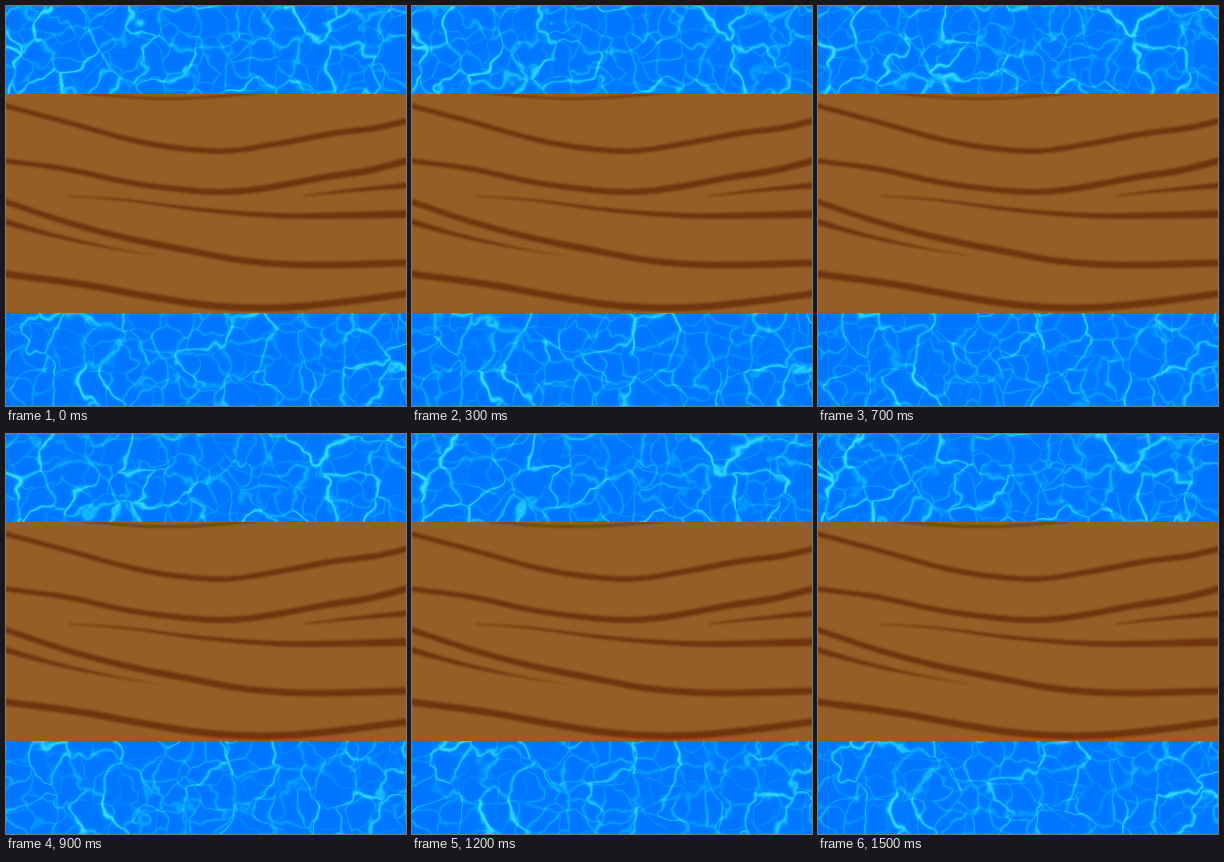
Write an HTML page with a canvas that moves like this. It is 400 px wide and 400 px high and loops after 1600 ms.

```html
<!DOCTYPE html>
<html lang="en">
<head>
<meta charset="utf-8">
<title>Plank over water</title>
<style>
  html, body { margin: 0; width: 100%; height: 100%; overflow: hidden; background: #007aff; }
  canvas, svg { position: absolute; left: 0; top: 0; width: 400px; height: 400px; display: block; }
</style>
</head>
<body>
<canvas id="water" width="400" height="400"></canvas>
<svg viewBox="0 0 400 400">
  <defs>
    <filter id="soft" x="-5%" y="-5%" width="110%" height="110%"><feGaussianBlur stdDeviation="0.8"/></filter>
    <clipPath id="board"><rect y="88" width="400" height="219"/></clipPath>
  </defs>
  <rect y="88" width="400" height="219" fill="#955e26"/>
  <g clip-path="url(#board)"><g id="grain" fill="#6f340d" filter="url(#soft)"></g></g>
</svg>
<script>
const SIZE = 400, LOOP = 1600, STEP = 100, STEPS = LOOP / STEP;
const TOP = 88, BOTTOM = 307;

// Wood grain: start width, end width, then x,y points along the line
const grain = [
  [2, 2, '76,87 135,92 190,92 252,87'],
  [5, 6, '-6,98 0,100 60,116 130,135 180,143 222,145 270,138 330,127 370,122 400,115 406,113'],
  [5, 7, '-6,154 0,155 60,163 120,176 180,184 220,186 260,182 320,171 360,165 400,155 406,153'],
  [1, 8, '63,190 120,194 180,202 230,207 290,210 406,208'],
  [1, 6, '297,190 340,185 406,179'],
  [6, 7, '-6,194 0,196 60,216 120,232 190,246 240,255 300,259 406,257'],
  [6, 0, '-6,214 0,216 50,230 100,241 159,251'],
  [7, 7, '-6,267 0,268 80,279 140,290 200,299 255,302 310,299 406,287']
];

// Smooth cubic segments through the points
function curve(pts) {
  let d = '';
  for (let i = 0; i < pts.length - 1; i++) {
    const a = pts[Math.max(i - 1, 0)], b = pts[i], c = pts[i + 1], e = pts[Math.min(i + 2, pts.length - 1)];
    const k = (c[0] - b[0]) / 3;
    const slope = (p, q) => (q[1] - p[1]) / (q[0] - p[0]);
    d += `C${b[0] + k},${b[1] + k * slope(a, c)} ${c[0] - k},${c[1] - k * slope(b, e)} ${c[0]},${c[1]}`;
  }
  return d;
}

for (const [w0, w1, text] of grain) {
  const pts = text.split(' ').map(p => p.split(',').map(Number));
  const x0 = pts[0][0], span = pts[pts.length - 1][0] - x0;
  const edge = side => pts.map(([x, y]) => [x, y + side * (w0 + (w1 - w0) * (x - x0) / span) / 2]);
  const upper = edge(-1), lower = edge(1).reverse();
  const path = document.createElementNS('http://www.w3.org/2000/svg', 'path');
  path.setAttribute('d', `M${upper[0]}${curve(upper)}L${lower[0]}${curve(lower)}Z`);
  document.getElementById('grain').append(path);
}

function hash(x, y, seed) {
  let h = Math.imul(x, 374761393) ^ Math.imul(y, 668265263) ^ Math.imul(seed, 1274126177);
  h = Math.imul(h ^ (h >>> 15), 2246822519);
  h = Math.imul(h ^ (h >>> 13), 3266489917);
  return ((h ^ (h >>> 16)) >>> 0) / 4294967296;
}

function noise(x, y, seed) {
  const i = Math.floor(x), j = Math.floor(y);
  let u = x - i, v = y - j;
  u *= u * (3 - 2 * u);
  v *= v * (3 - 2 * v);
  const a = hash(i, j, seed), b = hash(i + 1, j, seed);
  const c = hash(i, j + 1, seed), d = hash(i + 1, j + 1, seed);
  return a + (b - a) * u + (c - a + (a - b - c + d) * u) * v;
}

// A net of cells whose centres circle once per loop; returns line brightness at a point
function makeNet(cell, width, seed, angle) {
  const cols = Math.ceil(SIZE / cell) + 6, xs = [], ys = [];
  for (let n = 0; n < cols * cols; n++) {
    const i = n % cols, j = Math.floor(n / cols);
    const turn = angle + hash(i, j, seed + 2) * Math.PI * 2;
    xs[n] = (i - 3 + 0.1 + 0.8 * hash(i, j, seed) + 0.1 * Math.cos(turn)) * cell;
    ys[n] = (j - 3 + 0.1 + 0.8 * hash(i, j, seed + 1) + 0.1 * Math.sin(turn)) * cell;
  }
  return (x, y, gain) => {
    const ci = Math.floor(x / cell) + 3, cj = Math.floor(y / cell) + 3;
    let d1 = 1e9, d2 = 1e9, n1 = 0, n2 = 0;
    for (let j = cj - 1; j <= cj + 1; j++) {
      for (let i = ci - 1; i <= ci + 1; i++) {
        const n = j * cols + i, dx = xs[n] - x, dy = ys[n] - y, d = dx * dx + dy * dy;
        if (d < d1) { d2 = d1; n2 = n1; d1 = d; n1 = n; }
        else if (d < d2) { d2 = d; n2 = n; }
      }
    }
    const gap = (d2 - d1) / (2 * Math.hypot(xs[n1] - xs[n2], ys[n1] - ys[n2]));
    const power = 0.3 + 0.7 * hash(Math.min(n1, n2), Math.max(n1, n2), seed + 3);
    const q = gap / (width * (0.55 + 0.9 * gain));
    return power * (0.82 * Math.exp(-q * q) + 0.16 * Math.exp(-q * 0.45));
  };
}

function renderWater(step) {
  const angle = step / STEPS * Math.PI * 2;
  const ox = Math.cos(angle) * 0.3, oy = Math.sin(angle) * 0.3;
  const main = makeNet(37, 1.75, 11, angle), fine = makeNet(27, 1.2, 47, -angle);
  const image = new ImageData(SIZE, SIZE), px = image.data;
  for (let y = 0; y < SIZE; y++) {
    if (y === TOP) y = BOTTOM;
    for (let x = 0; x < SIZE; x++) {
      const wx = 20 * (noise(x / 21 + ox, y / 21 + oy, 1) - 0.5) + 7 * (noise(x / 8 + ox, y / 8 - oy, 2) - 0.5);
      const wy = 20 * (noise(x / 21 - oy, y / 21 + ox, 3) - 0.5) + 7 * (noise(x / 8 + oy, y / 8 + ox, 4) - 0.5);
      const gain = noise(x / 38 + ox, y / 38 + oy, 5);
      const a = main(x + wx, y + wy, gain) * (0.6 + 0.6 * gain);
      const b = fine(x - wy, y + wx, 1 - gain) * (0.6 - 0.25 * gain);
      const v = Math.min(1, a + b * (1 - 0.4 * a));
      const k = (y * SIZE + x) * 4;
      px[k] = 52 * v * v;
      px[k + 1] = 117 + 102 * v;
      px[k + 2] = 255;
      px[k + 3] = 255;
    }
  }
  return image;
}

const ctx = document.getElementById('water').getContext('2d');
const cache = [];
let shown = -1;

function draw() {
  const step = Math.floor(performance.now() % LOOP / STEP);
  if (step !== shown) {
    cache[step] ||= renderWater(step);
    ctx.putImageData(cache[step], 0, 0);
    shown = step;
  }
  requestAnimationFrame(draw);
}
draw();
</script>
</body>
</html>
```
